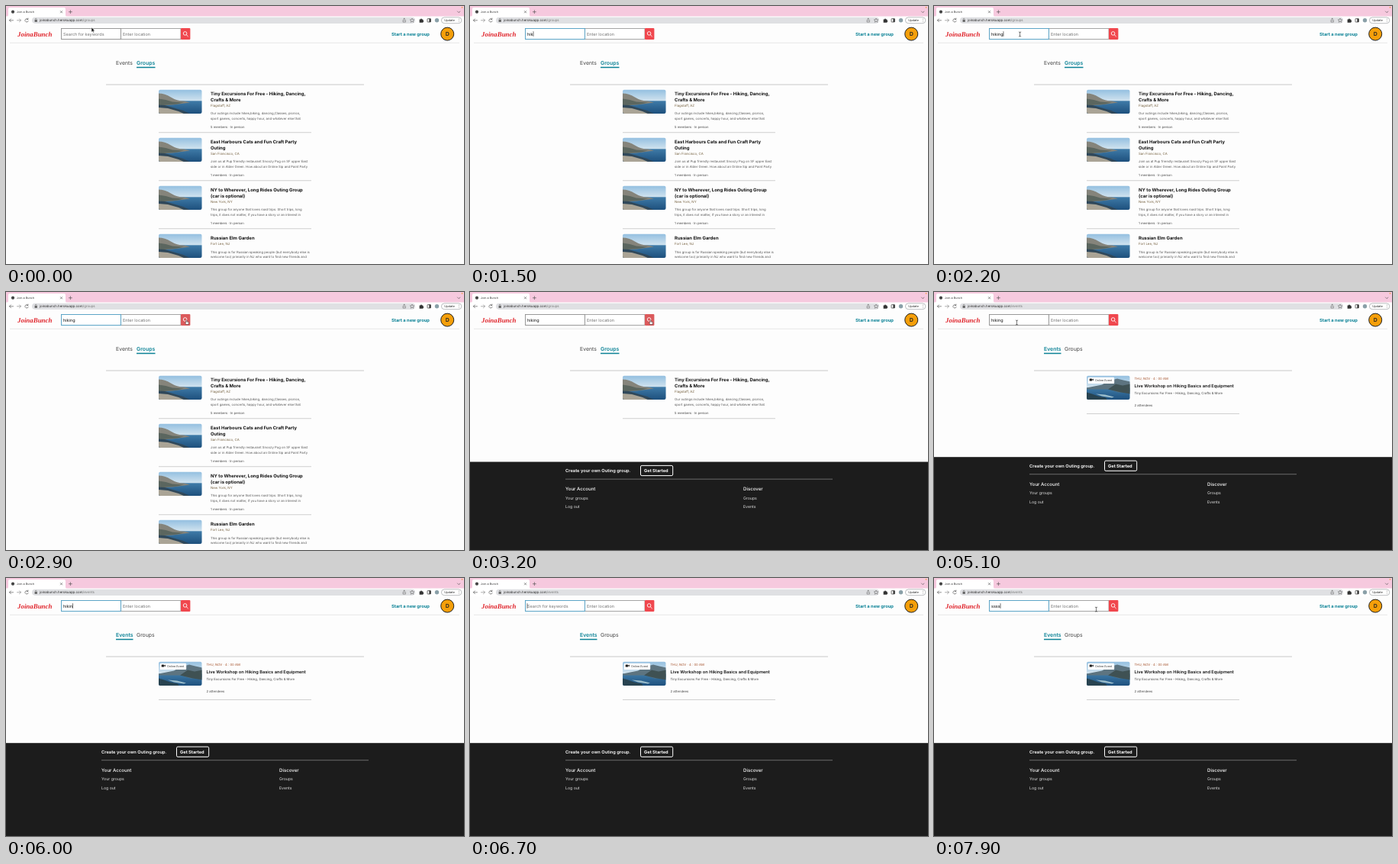
Write an HTML page that moves like this. It is 600x338 px and loops after 8000 ms.

```html
<!DOCTYPE html>
<html lang="en">
<head>
<meta charset="utf-8">
<title>Join a Bunch</title>
<style>
  html, body { margin: 0; width: 100%; height: 100%; overflow: hidden; background: #fdfdfd; }
  svg { display: block; width: 600px; height: 338px; font-family: Inter, Roboto, sans-serif; }
  text { white-space: pre; text-rendering: geometricPrecision; }
  .brand { font-family: "Liberation Serif", serif; font-weight: bold; font-style: italic; }
</style>
</head>
<body>
<svg id="stage" viewBox="0 0 600 338" xmlns="http://www.w3.org/2000/svg"></svg>
<script>
const LOOP = 8000, STEP = 100;
const TEAL = '#0b8296', RED = '#f0474e';

const text = (x, y, size, str, fill = '#222', weight = 400, extra = '') =>
  `<text x="${x}" y="${y}" font-size="${size}" fill="${fill}" font-weight="${weight}" ${extra}>${str.replace(/&/g, '&amp;')}</text>`;
const rect = (x, y, w, h, fill, extra = '') =>
  `<rect x="${x}" y="${y}" width="${w}" height="${h}" fill="${fill}" ${extra}/>`;
const circle = (x, y, r, fill, extra = '') =>
  `<circle cx="${x}" cy="${y}" r="${r}" fill="${fill}" ${extra}/>`;
const shape = (d, fill) => `<path d="${d}" fill="${fill}"/>`;
const stroke = (d, color, width = 0.6) =>
  `<path d="${d}" fill="none" stroke="${color}" stroke-width="${width}" stroke-linecap="round" stroke-linejoin="round"/>`;
const rule = (x1, x2, y, color) => rect(x1, y - 0.35, x2 - x1, 0.7, color);
const group = (id, body) => `<g id="${id}">${body}</g>`;

const defs = `<defs>
  <linearGradient id="sky" x2="0" y2="1"><stop stop-color="#93bfe0"/><stop offset=".5" stop-color="#d6e6f0"/></linearGradient>
  <linearGradient id="sea" x2="0" y2="1"><stop stop-color="#3f7ba8"/><stop offset="1" stop-color="#1d4f7c"/></linearGradient>
  <clipPath id="frame"><rect width="56.5" height="31.5" rx="2.5"/></clipPath>
  <g id="coast" clip-path="url(#frame)">
    ${rect(0, 0, 57, 32, 'url(#sky)')}
    ${rect(0, 14.8, 57, 17, 'url(#sea)')}
    ${shape('M0 5Q8 5 16 10T33 15L41 17L30 18.5L18 20L0 21Z', '#85847b')}
    ${shape('M0 12Q10 13 18 16L33 17L24 19L0 21Z', '#5b665f')}
    ${shape('M0 20L8 20.5L20 24L32 27.5L42 32H0Z', '#30485a')}
    ${shape('M0 23.5L12 24.5L26 28.5L34 32H0Z', '#aaa496')}
  </g>
  <g id="cliffs" clip-path="url(#frame)">
    ${rect(0, 0, 57, 32, 'url(#sky)')}
    ${rect(0, 16, 57, 16, 'url(#sea)')}
    ${shape('M0 16L20 12L29 7L40 4L48 6L57 8V21L42 22L30 18L0 18Z', '#5d7480')}
    ${shape('M28 18L38 11L47 13L57 11V24L45 22Z', '#3f5153')}
    ${shape('M0 22L7 24L15 27L25 29L27 32H0Z', '#284350')}
    ${shape('M12 24L24 25L36 28L33 29L20 27Z', '#9bbdcb')}
  </g>
</defs>`;

const browser = () =>
  rect(0, 0, 600, 14, '#f6c9de') +
  circle(597.5, 1.8, 0.9, '#f0a24a') +
  shape('M1 14Q3 14 3 12V4Q3 2 5 2H76Q78 2 78 4V12Q78 14 80 14Z', '#fff') +
  circle(9, 7.7, 2.1, '#444') +
  text(14, 9.2, 3.75, 'Join a Bunch', '#333') +
  stroke('M71.3 6.5l2.4 2.4m0-2.4l-2.4 2.4', '#444') +
  stroke('M82.4 7.7h4m-2-2v4', '#444') +
  stroke('M591.5 7l1.7 1.7 1.7-1.7', '#444') +
  rect(0, 13.5, 600, 10.5, '#fff') +
  stroke('M9.5 18.8h-5m2-2l-2 2 2 2', '#444') +
  stroke('M14.5 18.8h5m-2-2l2 2-2 2', '#777') +
  stroke('M28.8 17.4a2.2 2.2 0 1 0 .4 2.2m-.3-3.6v1.6h-1.7', '#444') +
  rect(34, 14.7, 502, 8.2, '#dfe0e3', 'rx="4.1"') +
  rect(37.6, 18.2, 3.2, 2.6, '#555', 'rx=".4"') +
  stroke('M38.3 18v-.8a.9.9 0 0 1 1.8 0v.8', '#555', 0.5) +
  `<text y="20.4" x="44" font-size="4.4" fill="#222">joinabunch.herokuapp.com<tspan id="path" fill="#777"></tspan></text>` +
  stroke('M520 18.5v2.6h3.4v-2.6m-1.7 1v-3.4m-1 1l1-1 1 1', '#555', 0.5) +
  `<path d="M532 16l.8 1.9 2 .1-1.6 1.3.6 2-1.8-1.1-1.8 1.1.6-2-1.6-1.3 2-.1Z" fill="none" stroke="#555" stroke-width=".5"/>` +
  shape('M541.6 17.4h1.5a.9.9 0 0 1 1.8 0h1.5v1.5a.9.9 0 0 1 0 1.8v1h-4.8Z', '#333') +
  rect(552, 16.6, 4.4, 4.4, 'none', 'rx=".5" stroke="#333" stroke-width=".7"') +
  rect(554.4, 16.6, 2, 4.4, '#333') +
  circle(564.5, 18.8, 2.7, '#8aa0a8') +
  rect(570.4, 14.9, 26.4, 7.8, '#fff', 'rx="3.9" stroke="#8d9296" stroke-width=".6"') +
  text(574.3, 20.2, 3.9, 'Update', '#222') +
  [17, 18.8, 20.6].map(y => circle(593.3, y, 0.4, '#444')).join('');

const header = () =>
  text(15, 39.8, 8.9, 'JoinaBunch', '#e0262d', 700, 'class="brand"') +
  rect(150.5, 29.5, 78.5, 14, '#fff', 'stroke="#8f8f8f" stroke-width=".8"') +
  rect(72.5, 29.5, 78, 14, '#fff', 'id="field" stroke-width=".9"') +
  text(75, 38.5, 5.5, '', '#111', 400, 'id="query"') +
  rect(75, 33.2, 0.6, 6.6, '#111', 'id="caret"') +
  text(153, 38.5, 5.55, 'Enter location', '#757575') +
  rect(229, 29, 12.4, 15, RED, 'id="button" rx="1"') +
  circle(234.6, 35.9, 2.3, 'none', 'stroke="#fff" stroke-width=".9"') +
  stroke('M236.4 37.8l2 2', '#fff', 0.9) +
  text(505, 38.8, 5.8, 'Start a new group', TEAL, 700) +
  circle(578.2, 36.6, 8.5, '#f59f0a', 'stroke="#1c1c1c" stroke-width="1"') +
  text(578.2, 39.1, 7, 'D', '#222', 600, 'text-anchor="middle"') +
  rule(5, 594, 48.2, '#dcdcdc') +
  text(144, 76.9, 6.9, 'Events', '', 400, 'id="tabEvents"') +
  text(171, 76.9, 6.9, 'Groups', '', 400, 'id="tabGroups"') +
  rect(0, 79.7, 0, 1.5, TEAL, 'id="underline"') +
  rule(131, 469, 103, '#b4b4b4');

const groups = [
  { title: ['Tiny Excursions For Free - Hiking, Dancing,', 'Crafts & More'], place: 'Flagstaff, AZ', size: 5,
    body: ['Our outings include hikes,biking, dancing,Classes, picnics,',
           'sport games, concerts, happy hour, and whatever else that'] },
  { title: ['East Harbours Cats and Fun Craft Party', 'Outing'], place: 'San Francisco, CA', size: 1,
    body: ['Join us at Pup friendly restaurant Snoozy Pug on SF upper East',
           'side or in Alder Green. How about an Online Sip and Paint Party'] },
  { title: ['NY to Wherever, Long Rides Outing Group', '(car is optional)'], place: 'New York, NY', size: 1,
    body: ['This group for anyone that loves road trips. Short trips, long',
           'trips, it does not matter, if you have a story or an interest in'] },
  { title: ['Russian Elm Garden'], place: 'Fort Lee, NJ', size: 1,
    body: ['This group is for Russian speaking people (but everybody else is',
           'welcome too) primarily in NJ who want to find new friends and'] }
];

function groupCard(g, i) {
  const top = 109.5 + 63 * i;
  const end = top + 7.5 * g.title.length;
  return `<use href="#coast" transform="translate(200 ${top})"/>` +
    g.title.map((s, n) => text(268, top + 7.6 + 7.5 * n, 5.95, s, '#111', 700)).join('') +
    text(268, end + 7.1, 4.37, g.place, '#75603f') +
    g.body.map((s, n) => text(268, end + 17.6 + 6.6 * n, 4.25, s, '#555')).join('') +
    text(268, end + 35.8, 4.22, `${g.size} members · In person`, '#444') +
    rule(200, 400, top + 56.3, '#bdbdbd');
}

const eventCard = () =>
  `<use href="#cliffs" transform="translate(200 109.5)"/>` +
  rect(201.7, 111.7, 34.5, 8.4, '#fff', 'rx="1.2"') +
  rect(203.7, 113.4, 3.3, 3, '#222', 'rx=".5"') +
  shape('M207.2 114.6l1.7-1v2.6l-1.7-1Z', '#222') +
  text(211, 117.2, 3.75, 'Online Event', '#333') +
  text(262.5, 115.3, 4.3, 'THU, NOV · 4 : 00 AM', '#a5522c') +
  text(262.5, 125.2, 5.7, 'Live Workshop on Hiking Basics and Equipment', '#111', 600) +
  text(262.5, 133.5, 4.25, 'Tiny Excursions For Free - Hiking, Dancing, Crafts & More', '#444') +
  text(262.5, 149.6, 4.25, '2 attendees', '#444') +
  rule(200, 400, 159.6, '#bdbdbd');

const footer = () =>
  rect(0, 0, 600, 130, '#1c1c1c') +
  text(125, 13.6, 5.75, 'Create your own Outing group.', '#fff', 600) +
  rect(223.5, 4.9, 42.2, 13.2, 'none', 'rx="1.6" stroke="#fff" stroke-width="1"') +
  text(228, 13.6, 5.7, 'Get Started', '#fff', 700) +
  rule(125, 475, 22.6, '#8c8c8c') +
  [[125, 'Your Account', 'Your groups', 'Log out'], [358, 'Discover', 'Groups', 'Events']]
    .map(([x, head, a, b]) => text(x, 37.6, 6.1, head, '#fff', 500) +
      text(x, 49, 5.2, a, '#ddd') + text(x, 60.8, 5.2, b, '#ddd')).join('');

const pointers =
  group('arrow', `<path d="M0 0V6.2L1.5 4.9 2.5 7 3.5 6.5 2.5 4.5H4.5Z" fill="#111" stroke="#fff" stroke-width=".5"/>`) +
  group('hand', `<path d="M-.5.4Q0-.4.5.4V2L2.5 2.4Q3.1 2.6 2.9 3.5L2.5 5.6H-.3L-1.8 3.5Q-1.6 2.4-.5 3Z" fill="#fff" stroke="#222" stroke-width=".5"/>`) +
  group('beam', stroke('M-1.2-3Q0-3 0-2.3Q0-3 1.2-3M0-2.3V2.3M-1.2 3Q0 3 0 2.3Q0 3 1.2 3', '#222', 0.6));

const stage = document.getElementById('stage');
stage.innerHTML = defs + rect(0, 0, 600, 338, '#fdfdfd') + header() +
  groups.map((g, i) => group('group' + i, groupCard(g, i))).join('') +
  group('event', eventCard()) + group('footer', footer()) + browser() + pointers;

const $ = id => document.getElementById(id);
const show = (id, on) => $(id).setAttribute('visibility', on ? 'visible' : 'hidden');
const set = (id, attrs) => Object.entries(attrs).forEach(([k, v]) => $(id).setAttribute(k, v));

// [time, x, y] of the pointer's hot spot
const track = [
  [0, 112, 28], [100, 112, 28], [200, 111, 33], [600, 111, 33], [800, 107, 37], [2100, 107, 37],
  [2900, 236.5, 37], [3300, 236.5, 37], [4000, 170, 70], [4300, 159.8, 74.5], [4700, 159.8, 74.5],
  [5100, 108.5, 40], [5300, 101, 38], [7600, 101, 38], [7900, 212.5, 41.2], [8000, 212.5, 41.2]
];
// [time, letters in the field]
const typing = [
  [0, ''], [1300, 'h'], [1400, 'hi'], [1500, 'hik'], [1700, 'hiki'], [1900, 'hikin'], [2100, 'hiking'],
  [6000, 'hikin'], [6100, 'hiki'], [6200, 'hik'], [6300, 'hi'], [6400, 'h'], [6500, ''],
  [7000, 's'], [7200, 'ss'], [7400, 'sss'], [7600, 'ssss']
];
const focusSpans = [[1000, 3200], [5500, LOOP]];
const hiddenSpans = [[1300, 2200], [6000, 7700]];
const SEARCH = 3200, EVENTS = 4600;

const spanAt = (spans, t) => spans.find(([a, b]) => t >= a && t < b);
const ease = p => p * p * (3 - 2 * p);

function pointAt(t) {
  const i = track.findIndex(k => k[0] > t);
  const [t0, x0, y0] = track[i - 1], [t1, x1, y1] = track[i];
  const p = ease((t - t0) / (t1 - t0));
  return [x0 + (x1 - x0) * p, y0 + (y1 - y0) * p];
}

function pointerKind(x, y) {
  const inBar = y > 29 && y < 44;
  if (inBar && x > 72 && x < 229) return 'beam';
  if (inBar && x >= 229 && x < 241.5) return 'hand';
  if (y > 68 && y < 81 && x > 143 && x < 196) return 'hand';
  return 'arrow';
}

function setTab(id, active) {
  set(id, { fill: active ? TEAL : '#444', 'font-weight': active ? 600 : 400 });
}

function render(t) {
  const searched = t >= SEARCH, onEvents = t >= EVENTS;

  groups.forEach((g, i) => show('group' + i, !onEvents && (i === 0 || !searched)));
  show('event', onEvents);
  show('footer', searched);
  set('footer', { transform: `translate(0 ${onEvents ? 216.2 : 222.5})` });
  setTab('tabEvents', onEvents);
  setTab('tabGroups', !onEvents);
  set('underline', onEvents ? { x: 144, width: 22.5 } : { x: 171, width: 24.5 });
  $('path').textContent = onEvents ? '/events' : '/groups';

  const [typedAt, value] = typing.filter(k => k[0] <= t).pop();
  const focus = spanAt(focusSpans, t);
  const query = $('query');
  query.textContent = value || 'Search for keywords';
  set('query', { fill: value ? '#111' : '#757575' });
  set('field', { stroke: focus ? '#4d9cc2' : '#8f8f8f' });
  const since = focus ? t - Math.max(typedAt, focus[0]) : 0;
  show('caret', focus && since % 1000 < 500);
  set('caret', { x: 75 + (value ? query.getComputedTextLength() + 0.1 : -0.3) });

  const [x, y] = pointAt(t);
  const kind = spanAt(hiddenSpans, t) ? '' : pointerKind(x, y);
  for (const id of ['arrow', 'hand', 'beam']) {
    show(id, id === kind);
    set(id, { transform: `translate(${x} ${y})` });
  }
  set('button', { fill: kind === 'hand' && x > 229 ? '#db5a5c' : RED });
}

const start = performance.now();
function tick() {
  const t = (performance.now() - start) % LOOP;
  render(Math.floor(t / STEP) * STEP);
  requestAnimationFrame(tick);
}
tick();
</script>
</body>
</html>
```
